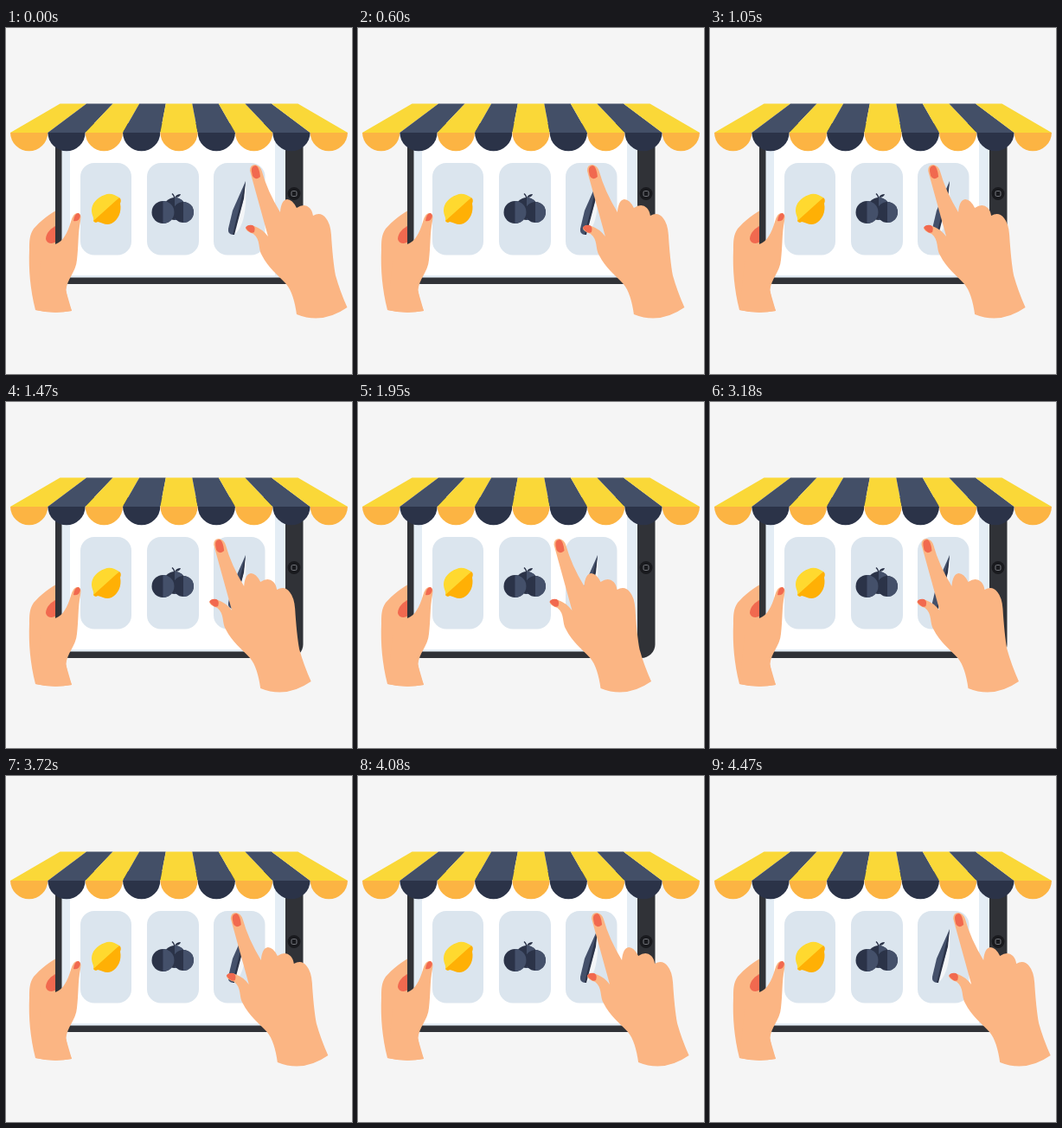
An HTML page for the animation above (4500 ms loop, 400 px wide and 400 px high).

```html
<!DOCTYPE html>
<html lang="en">
<head>
<meta charset="utf-8">
<title>Tablet shop</title>
<style>
  html, body { margin: 0; width: 100%; height: 100%; overflow: hidden; background: #f5f5f5; }
  svg { display: block; width: 100vw; height: 100vh; }
  .skin { fill: #fbb583; }
  .nail { fill: #f1694f; }
  .navy { fill: #2b3348; }
  .slate { fill: #44506a; }
</style>
</head>
<body>
<svg viewBox="0 0 400 400">
  <!-- fingers behind the tablet -->
  <path class="skin" d="M62 209C52 213 39 224 32 232C27 239 27 247 27 256C26 279 28 302 34 326Q55 331 76 327L69 303L70 240Z"/>
  <path class="nail" d="M60 228C51 231 46 238 46 244Q47 249 53 249L62 246Z"/>

  <!-- tablet -->
  <rect x="57" y="110" width="286.500" height="186" rx="16" fill="#303237"/>
  <path fill="#e4edf5" d="M64.500 120H323V288.500H75Q64.500 288 64.500 279Z"/>
  <path fill="#fff" d="M74 120H311V286H76L74 284Z"/>
  <circle cx="333" cy="191.500" r="7.500" fill="#191a1e"/>
  <rect x="330" y="188.500" width="6" height="6" rx="1.500" fill="none" stroke="#74777d"/>

  <g fill="#dbe5ee">
    <rect x="86" y="156" width="59" height="106.500" rx="16"/>
    <rect x="163" y="156" width="60" height="106.500" rx="16"/>
    <rect x="240" y="156" width="59.500" height="106.500" rx="16"/>
  </g>

  <!-- lemon -->
  <path fill="#ffd92f" d="M131 196C126 193 120 190 114 193C105 196 99 203 99 211C99 216 102 219 101 223Q103 226 106 224Z"/>
  <path fill="#ffb005" d="M131 196Q134 198 132 203C134 212 130 222 122 226C116 229 111 225 106 224Q103 226 101 223Z"/>

  <!-- plums -->
  <path d="M195 199Q195 194 192 191.500" fill="none" stroke="#2b3348" stroke-width="1.500"/>
  <path class="navy" d="M195 196Q197 192 202 192Q201 196 195 196Z"/>
  <g id="plums"></g>

  <!-- long vegetable -->
  <path fill="#f4f6f8" d="M277 178C278 198 277 214 273 225Q269 236 263 239Z"/>
  <path class="slate" d="M277 177L262 211L257 232Q256 239 263 239L274 200Z"/>
  <path class="navy" d="M277 177L262 239H264L275 197Z"/>

  <g id="awning"></g>

  <!-- thumb in front of the tablet -->
  <path class="skin" d="M57 250C66 247 71 237 75 224Q78 213 83 214Q88 215 86 223C83 238 84 252 82 268C81 282 70 291 69.500 303Q71 316 76 327Q55 331 34 326L40 270Z"/>
  <path class="nail" d="M78 223Q79 214 84 214Q87 216 85 220Q83 224 78 223Z"/>

  <g id="hand">
    <path class="skin" d="M282 165Q282 158 288 158Q294 159 296 166Q302 188 317 213Q318 199 325 198Q331 198 336 208Q345 202 351 208Q354 211 355 217Q364 212 370 220Q375 226 376 239C377 256 379 276 381 286Q386 304 394.500 323Q366 343 336 331C334 316 330 303 324 296C314 285 303 277 296 263C291 255 295 245 286 238Q277 235 277 231Q280 226 287 229Q296 232 303 241Z"/>
    <path class="nail" d="M284 166Q283 159 289 159Q293 161 294 172Q288 177 285 171Z"/>
    <path class="nail" d="M277 231Q279 227 285 228Q289 230 287 236Q283 239 277 231Z"/>
  </g>
</svg>
<script>
  const PERIOD = 4500, REACH = 64, STRIPES = 9;
  const byId = id => document.getElementById(id);
  const hand = byId('hand');

  // each plum is dark with a lighter right half
  const plum = (x, y, r) => `<circle class="navy" cx="${x}" cy="${y}" r="${r}"/>
    <path class="slate" d="M${x} ${y - r}A${r} ${r} 0 0 1 ${x} ${y + r}Z"/>`;
  byId('plums').innerHTML = plum(195, 209, 13) + plum(205, 213, 12) + plum(181.5, 213, 13);

  // tapered stripes, each ending in a semicircle
  const topX = i => 62.5 + i * 275 / STRIPES;
  const bottomX = i => 5 + i * 390 / STRIPES;
  let awning = '';
  for (let i = 0; i < STRIPES; i++) {
    const [stripe, scallop] = i % 2 ? ['#434f67', '#2b3348'] : ['#fad838', '#fcb443'];
    const left = bottomX(i), right = bottomX(i + 1);
    awning += `<path fill="${stripe}" d="M${topX(i)} 87.500H${topX(i + 1)}L${right} 121H${left}Z"/>
      <path fill="${scallop}" d="M${left} 121A21.670 21.670 0 0 0 ${right} 121Z"/>`;
  }
  byId('awning').innerHTML = awning;

  // the hand sweeps left and back at constant speed
  function draw(now) {
    const phase = now % PERIOD / PERIOD;
    const shift = REACH * (1 - Math.abs(1 - 2 * phase));
    hand.setAttribute('transform', `translate(${-shift} 0)`);
    requestAnimationFrame(draw);
  }
  draw(performance.now());
</script>
</body>
</html>
```
